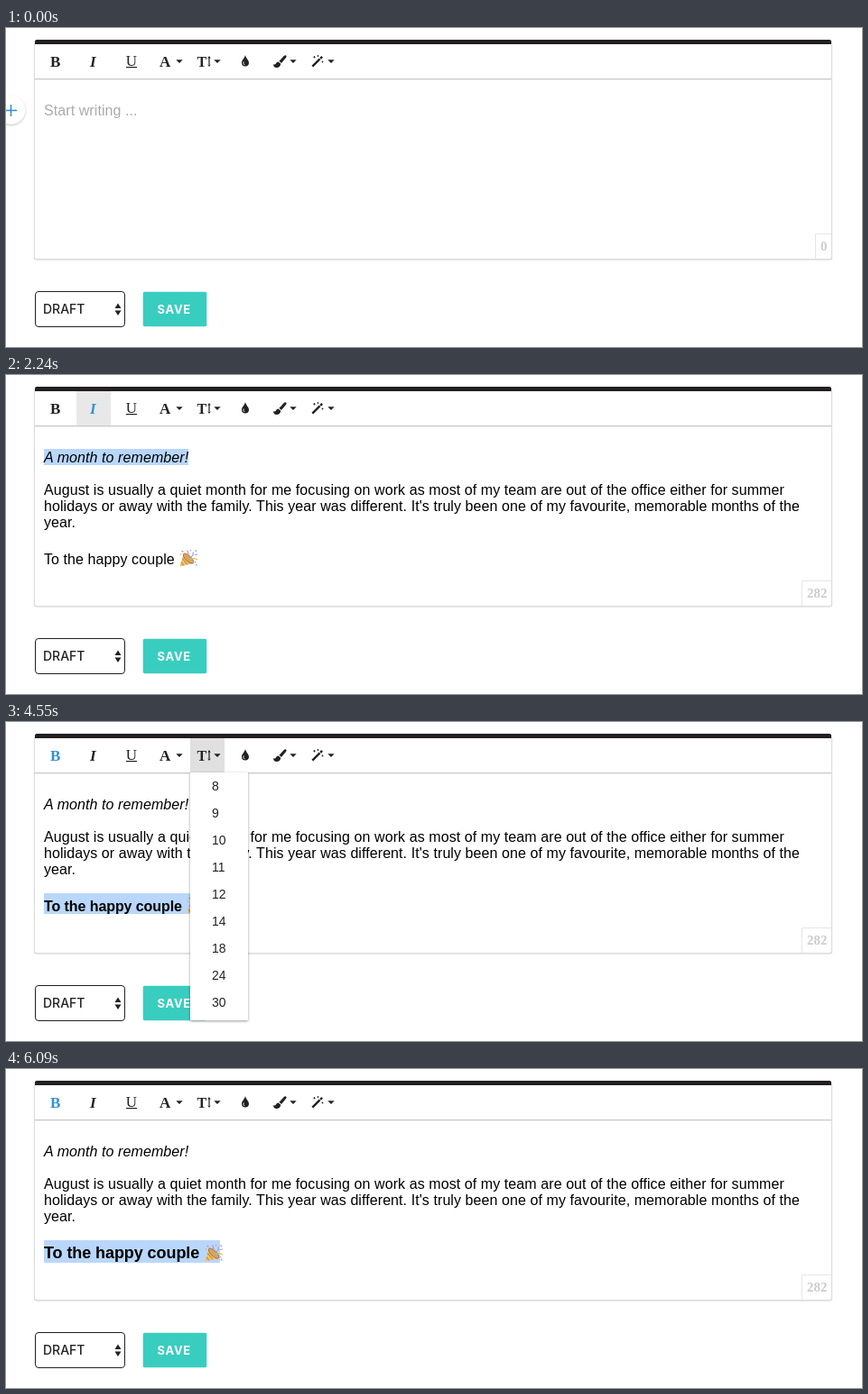
Animation of 948 by 354 pixels, one loop 6160 ms. Source, as an HTML page:

```html
<!DOCTYPE html>
<html lang="en">
<head>
<meta charset="utf-8">
<title>Rich text editor</title>
<style>
html, body { margin: 0; width: 100%; height: 100%; overflow: hidden; background: #fff; }
svg { display: block; width: 948px; height: 354px; font: 16px "Liberation Sans", Arial, sans-serif; }
text { white-space: pre; }
.serif { font: bold 17px "Liberation Serif", Times, serif; fill: #222; }
.ui { font-family: Inter, sans-serif; }
.body { letter-spacing: .08px; }
.soft { filter: drop-shadow(0 1px 1px rgba(0,0,0,.24)); }
</style>
</head>
<body>
<svg viewBox="0 0 948 354" id="stage">
  <rect width="948" height="354" fill="#fff"/>
  <g id="plus">
    <circle cx="5.5" cy="91" r="16" fill="#fff" class="soft"/>
    <path d="M-1 91.5H12M5.5 85V98" stroke="#2f8bcc" stroke-width="1.5"/>
  </g>

  <rect x="32" y="14" width="882" height="242" rx="2" fill="#fff" class="soft"/>
  <path d="M31.5 18V256.5H914.5V18" fill="none" stroke="#dcdcdc"/>
  <path d="M32 18V15Q32 13 34 13H912Q914 13 914 15V18Z" fill="#231f20"/>
  <path d="M32 56.5H914" stroke="#c9c9c9"/>
  <path d="M32 57.5H914" stroke="#ededed"/>

  <g id="hovers">
    <rect id="hoverB" x="36" y="18" width="38" height="38"/>
    <rect id="hoverI" x="78" y="18" width="38" height="38"/>
    <rect id="hoverT" x="204" y="18" width="38" height="38"/>
  </g>

  <g class="serif">
    <text id="iconB" x="49" y="43">B</text>
    <text id="iconI" x="93" y="43" font-style="italic">I</text>
    <text x="132.8" y="42" style="font-weight:400">U</text>
    <text x="170" y="43">A</text>
    <text x="211.5" y="43" style="font-size:16px">T</text>
  </g>
  <g fill="#222">
    <path d="M133 43H145V44.2H133Z"/>
    <path d="M224.4 33H225.6V41H224.4ZM223.3 33.5L225 31 226.7 33.5ZM223.3 40.5L225 43 226.7 40.5Z"/>
    <path d="M265 30C266 34 269 35.5 269 38.5A4 4 0 0 1 261 38.5C261 35.5 264 34 265 30Z"/>
    <path d="M309.5 30.2Q311.5 30.8 310 33L305 39 302.5 36.8 307.8 31Q308.7 30 309.5 30.2ZM301.7 37.5L304.3 39.8Q303.8 44 299.5 44 296.3 44 296 40.2 298 41.2 298.9 39.5 299.8 37.4 301.7 37.5Z"/>
    <path d="M338.5 41.8L346.7 33.6 348.4 35.3 340.2 43.5ZM347.3 33L349.3 31 351 32.7 349 34.7Z"/>
    <path d="M341.5 31V33.5M340.2 32.3H342.8M345.5 30V32M344.5 31H346.5M350.5 36.5V38.5M349.5 37.5H351.5" stroke="#222" stroke-width=".8"/>
    <g id="carets"></g>
  </g>
  <path d="M263.2 37.5Q262.2 40 264.3 41" fill="none" stroke="#fff" stroke-width=".9"/>

  <text id="placeholder" class="body" x="42" y="97" fill="#aaa">Start writing ...</text>
  <path id="cursor" d="M42.5 82V100" stroke="#000"/>

  <g id="article" class="body">
    <rect id="titleMark" x="42" y="82" height="18" fill="#b9d7fb"/>
    <rect id="endMark" x="42" y="190" fill="#b9d7fb"/>
    <text id="title" x="42" y="97">A month to remember!</text>
    <text x="42" y="133">August is usually a quiet month for me focusing on work as most of my team are out of the office either for summer</text>
    <text x="42" y="151">holidays or away with the family. This year was different. It's truly been one of my favourite, memorable months of the</text>
    <text x="42" y="169">year.</text>
    <text id="ending" x="42" y="210">To the happy couple</text>
    <g id="popper">
      <path d="M.5 19.5L4.5 5.5Q13 8 15.5 16Z" fill="#f2c469"/>
      <path d="M3.3 10.5L9 17.4M2 15L5 18.4" stroke="#c98f45" stroke-width="1.2"/>
      <ellipse cx="10" cy="10.6" rx="3" ry="7.4" transform="rotate(-46 10 10.6)" fill="#d9a55a" stroke="#8f6a48" stroke-width=".8"/>
      <g fill="none" stroke-width="1.2">
        <path d="M9 9Q11 5 8.5 1.5M2.5 2L4.5 3.5" stroke="#dc9087"/>
        <path d="M11 9.5Q16.5 8 15 3.5M18 17L19.5 18.5" stroke="#86aed4"/>
        <path d="M12 11.5Q17 9.5 20 12M.5 5.5L2 6.5" stroke="#e3b767"/>
        <path d="M17.5 1.5L19 3M17 6.5L20 6M12.5 1V2.5M17 14.5L18.5 15" stroke="#b29bbb"/>
      </g>
    </g>
  </g>

  <path id="counterBox" fill="#fff" stroke="#e6e6e6"/>
  <text id="counter" x="909.5" y="247" text-anchor="end" class="serif" style="font-size:15px;fill:#ccc"></text>

  <rect x="32.5" y="292.5" width="99" height="39" rx="3.5" fill="#fff" stroke="#222"/>
  <text class="ui" x="41" y="317" font-size="14" font-weight="500" fill="#222">DRAFT</text>
  <path d="M120.5 311L124 305.5 127.5 311ZM120.5 313.5L124 319 127.5 313.5Z" fill="#222"/>
  <rect x="151.7" y="292.7" width="70.6" height="38.6" rx="2" fill="#39cdc0"/>
  <text class="ui" x="167.5" y="317" font-size="13" font-weight="700" letter-spacing=".7" fill="#fff">SAVE</text>

  <g id="tooltip">
    <rect x="192" y="57" width="62" height="21"/>
    <text x="200" y="71" font-size="11" fill="#fff">Font Size</text>
  </g>
  <g id="menu">
    <rect x="204" y="56" width="64" height="275" fill="#fff" style="filter:drop-shadow(0 1px 1.5px rgba(0,0,0,.4))"/>
    <rect id="menuHover" x="204" width="64" height="30" fill="#dcdcdc"/>
    <g id="sizes" font-size="14" fill="#222"></g>
  </g>
</svg>
<script>
const LOOP = 6160, STEP = 70;
const BLUE = '#3292d2', INK = '#222';
const PASTE = 840, ITALIC = 2100, BOLD = 3990, OPEN = 4550, CLOSE = 5530;
const el = {};
document.querySelectorAll('[id]').forEach(node => el[node.id] = node);

el.carets.innerHTML = [192, 234, 318, 360]
  .map(x => `<path d="M${x - 3.7} 35.3H${x + 3.7}L${x} 39Z"/>`).join('');
el.sizes.innerHTML = [8, 9, 10, 11, 12, 14, 18, 24, 30]
  .map((size, i) => `<text x="228" y="${76 + 30 * i}">${size}</text>`).join('');

const set = (node, attrs) => Object.entries(attrs).forEach(([k, v]) => node.setAttribute(k, v));
const show = (node, on) => node.setAttribute('visibility', on ? 'inherit' : 'hidden');
const ramp = (t, from, to) => Math.max(0, Math.min(1, (t - from) / (to - from)));
const ease = p => p * p * (3 - 2 * p);
const within = (t, from, to) => t >= from && t < to;

function hover(node, on, shade) {
  show(node, on);
  node.setAttribute('fill', `rgb(${shade},${shade},${shade})`);
}

function draw(t) {
  const written = t >= PASTE, bold = t >= BOLD, large = t >= CLOSE;
  const open = within(t, OPEN, CLOSE);

  show(el.plus, !written);
  show(el.placeholder, !written);
  show(el.cursor, within(t, 420, PASTE));
  show(el.article, written);

  set(el.titleMark, { width: t < 2520 ? 160 * ease(ramp(t, 1190, 1540)) : 0 });
  set(el.title, { 'font-style': t >= ITALIC ? 'italic' : 'normal' });

  const popperX = large ? 220 : bold ? 200 : 192;
  const markWidth = large ? 195 : bold ? 175 : 165;
  set(el.endMark, { width: markWidth * ease(ramp(t, 2660, 2940)), height: large ? 25 : 23 });
  set(el.ending, {
    'font-weight': bold ? 700 : 400,
    'font-size': large ? 18 : 16,
    'letter-spacing': bold ? -0.08 : 0.08
  });
  set(el.popper, { transform: `translate(${popperX} ${large ? 194 : 193})` });

  el.counter.textContent = written ? '282' : '0';
  set(el.counterBox, { d: `M${written ? 881.5 : 896.5} 256V228.5H914` });

  el.iconB.style.fill = bold ? BLUE : INK;
  el.iconI.style.fill = within(t, ITALIC, 3150) ? BLUE : INK;
  hover(el.hoverB, within(t, 3920, 4200), 228);
  hover(el.hoverI, within(t, 1960, 2380), 232);
  hover(el.hoverT, within(t, 4340, CLOSE), Math.round(open ? 224 - 8 * ramp(t, OPEN, 4760) : 235));

  set(el.tooltip, { opacity: within(t, 3850, 4060) ? 0.08 + 0.12 * ramp(t, 3990, 3920) : 0 });

  show(el.menu, open);
  const row = Math.round(6 * ease(ramp(t, 4620, 5180)));
  show(el.menuHover, open && t >= 4690);
  set(el.menuHover, { y: 56 + 30 * row });
}

const start = performance.now();
function tick() {
  const time = (performance.now() - start) % LOOP;
  draw(Math.floor(time / STEP) * STEP);
  requestAnimationFrame(tick);
}
draw(0);
requestAnimationFrame(tick);
</script>
</body>
</html>
```
